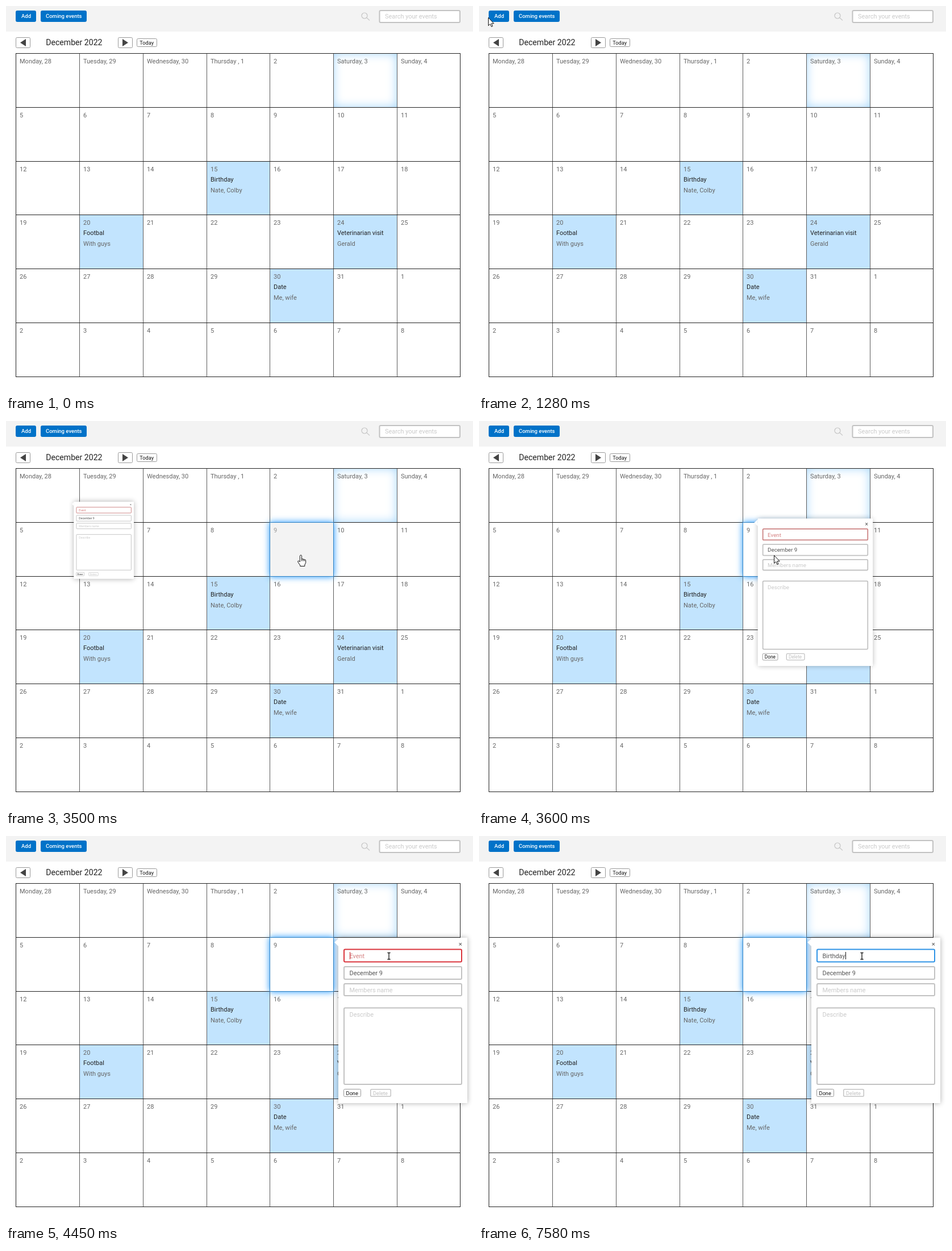
Recreate the animation shown at these times as an HTML page with a canvas. Size 822x681 px, loop 8000 ms.

```html
<!DOCTYPE html>
<html lang="en">
<head>
<meta charset="utf-8">
<title>Event calendar</title>
<style>
  html, body { margin: 0; width: 100%; height: 100%; overflow: hidden; background: #fff; }
  canvas { display: block; width: 822px; height: 681px; }
</style>
</head>
<body>
<canvas id="stage"></canvas>
<script>
const W = 822, H = 681, LOOP = 8000;
const canvas = document.getElementById('stage');
const ctx = canvas.getContext('2d');
const dpr = window.devicePixelRatio || 1;
canvas.width = W * dpr;
canvas.height = H * dpr;

const GREY = '#666', DARK = '#222', FIELD = '#c2c2c2', HINT = '#cacaca';
const EVENT_FILL = '#c2e4fe';
const headings = ['Monday, 28', 'Tuesday, 29', 'Wednesday, 30', 'Thursday , 1', '2', 'Saturday, 3', 'Sunday, 4'];
const events = {
  17: ['Birthday', 'Nate, Colby'],
  22: ['Footbal', 'With guys'],
  26: ['Veterinarian visit', 'Gerald'],
  32: ['Date', 'Me, wife']
};
const TODAY = 5, PICKED = 11;

const word = 'Birthday';
const keyTimes = [5840, 5950, 6080, 6230, 6380, 7290, 7370, 7580];
const caretOff = [[4890, 5400], [6920, 7290]];
const FOCUS = 4350, OPEN = 3418, OPEN_MS = 300;

// Each path: [time, x, y]
const paths = [
  [[530, 783, 598], [590, 728, 547], [800, 420, 350], [1020, 163, 170], [1190, 42, 46], [1280, 16, 20]],
  [[1350, 16, 20], [1450, 58, 55], [1620, 168, 166], [1850, 420, 310], [2010, 512, 358]],
  [[2290, 698, 668], [2350, 612, 495], [2420, 535, 314], [2560, 520, 254], [2810, 519, 236]],
  [[3640, 519, 236], [3800, 606, 215], [4010, 674, 211]]
];

const clamp = v => Math.min(1, Math.max(0, v));
const ramp = (t, from, ms) => clamp((t - from) / ms);
const lerp = (a, b, p) => a + (b - a) * p;
const gridX = i => Math.round(17.4 + 111.7 * i);
const gridY = j => Math.round(83 + 94.8 * j);

function mix(a, b, p) {
  return `rgb(${a.map((v, i) => Math.round(lerp(v, b[i], p)))})`;
}

// cubic-bezier(.25, .1, .25, 1)
function ease(x) {
  if (x <= 0 || x >= 1) return clamp(x);
  const bez = (u, a, b) => 3 * u * (1 - u) ** 2 * a + 3 * u * u * (1 - u) * b + u ** 3;
  let lo = 0, hi = 1;
  for (let i = 0; i < 24; i++) {
    const mid = (lo + hi) / 2;
    if (bez(mid, .25, .25) < x) lo = mid; else hi = mid;
  }
  return bez(lo, .1, 1);
}

function text(s, x, y, size = 11, color = GREY, weight = 400) {
  ctx.font = `${weight} ${size}px Roboto, sans-serif`;
  ctx.fillStyle = color;
  ctx.fillText(s, x, y);
}

function rect(x, y, w, h, color) {
  ctx.fillStyle = color;
  ctx.fillRect(x, y, w, h);
}

// Rounded box with its border drawn inside the bounds
function box(x, y, w, h, stroke, line = 1, fill = '#fff', r = 2) {
  ctx.beginPath();
  ctx.roundRect(x + line / 2, y + line / 2, w - line, h - line, r);
  ctx.fillStyle = fill;
  ctx.fill();
  ctx.lineWidth = line;
  ctx.strokeStyle = stroke;
  ctx.stroke();
}

function poly(points, fill) {
  ctx.beginPath();
  points.forEach(([x, y]) => ctx.lineTo(x, y));
  ctx.closePath();
  ctx.fillStyle = fill;
  ctx.fill();
}

function shadow(color, blur) {
  ctx.shadowColor = color;
  ctx.shadowBlur = blur * dpr;
}

function drawHeader() {
  rect(0, 0, W, 45, '#f3f3f3');
  box(17, 8, 36, 20, '#0072c8', 1, '#0072c8');
  box(61, 8, 81, 20, '#0072c8', 1, '#0072c8');
  text('Add', 27, 21, 9.5, '#fff', 500);
  text('Coming events', 70, 21, 9.5, '#fff', 500);

  ctx.strokeStyle = '#c4c4c4';
  ctx.lineWidth = 1.2;
  ctx.beginPath();
  ctx.arc(631, 17, 5, 0, 7);
  ctx.moveTo(634.8, 20.6);
  ctx.lineTo(640, 25.4);
  ctx.stroke();
  box(656.5, 7, 143.5, 23, FIELD, 2);
  text('Search your events', 667, 22, 10.9, HINT);

  box(17, 55, 26, 19, '#999');
  box(197, 55, 26, 19, '#999');
  poly([[25, 64.5], [35, 58], [35, 71]], '#444');
  poly([[215, 64.5], [205, 58], [205, 71]], '#444');
  text('December 2022', 70.2, 69, 14.1, DARK);
  box(230, 57, 36, 15, '#999');
  text('Today', 235.3, 68, 9.2, '#111');
}

function cellRect(i) {
  const c = i % 7, r = Math.floor(i / 7);
  const x = gridX(c), y = gridY(r);
  return [x, y, gridX(c + 1) - x, gridY(r + 1) - y];
}

function drawDay(i) {
  const [x, y] = cellRect(i);
  const day = i - 2 > 31 ? i - 33 : i - 2;
  text(headings[i] || String(day), x + 7, y + 17.5);
}

function innerGlow(x, y, w, h) {
  ctx.save();
  ctx.beginPath();
  ctx.rect(x, y, w, h);
  ctx.clip();
  shadow('#a5d6fb', 18);
  ctx.beginPath();
  ctx.rect(x - 40, y - 40, w + 80, h + 80);
  ctx.rect(x, y, w, h);
  ctx.fillStyle = '#a5d6fb';
  ctx.fill('evenodd');
  ctx.restore();
}

function drawCalendar() {
  for (const i in events) rect(...cellRect(+i), EVENT_FILL);
  innerGlow(...cellRect(TODAY));
  const left = gridX(0), top = gridY(0), right = gridX(7), bottom = gridY(6);
  for (let c = 0; c <= 7; c++) rect(gridX(c), top, 1, bottom - top + 1, c % 7 ? '#5c5c5c' : '#222');
  for (let r = 0; r <= 6; r++) rect(left, gridY(r), right - left + 1, 1, '#222');
  for (let i = 0; i < 42; i++) {
    drawDay(i);
    if (!events[i]) continue;
    const [x, y] = cellRect(i);
    text(events[i][0], x + 7, y + 36, 11, DARK);
    text(events[i][1], x + 7, y + 55);
  }
}

function drawPicked(t) {
  const glow = ramp(t, 3210, 200);
  const hover = t < 3570 ? ramp(t, 2570, 200) : 0;
  if (!glow && !hover) return;
  const [x, y, w, h] = cellRect(PICKED);
  const fill = mix([255, 255, 255], [243, 243, 243], hover);
  if (glow) {
    ctx.save();
    shadow(`rgba(30,150,255,${glow})`, 11);
    rect(x, y, w + 1, h + 1, '#2d7fc0');
    ctx.restore();
  }
  rect(x + 1, y + 1, w - 1, h - 1, fill);
  text('9', x + 7, y + 17.5, 11, mix([102, 102, 102], [150, 150, 150], hover));
}

function drawEventField(t) {
  const calm = [204, 130, 130], red = [218, 52, 60], blue = [47, 148, 230];
  const typed = keyTimes.filter(k => t >= k).length;
  const border = typed
    ? mix(red, blue, ramp(t, keyTimes[0], 250))
    : mix(calm, red, ramp(t, FOCUS, 100));
  const value = word.slice(0, typed);
  box(9, 19.5, 209, 24, border, 2);
  text(value || 'Event', 19.5, 36, 10.9, typed ? '#555' : '#d58080');
  const blinkOff = caretOff.some(([a, b]) => t >= a && t < b);
  if (t >= FOCUS && !blinkOff) {
    const x = typed ? 19.5 + ctx.measureText(value).width : 19.5;
    rect(Math.round(x), 25, 1, 13, typed ? '#111' : '#c8202a');
  }
}

function drawDialog(t) {
  if (t < OPEN) return;
  const s = ease((t - OPEN) / OPEN_MS);
  if (s < .02) return;
  ctx.save();
  ctx.translate(lerp(-287, 585, s), lerp(110, 179, s));
  ctx.scale(s, s);

  ctx.save();
  shadow('rgba(0,0,0,.32)', 9);
  rect(0, 0, 227, 291, '#fff');
  ctx.restore();
  poly([[0, 2], [-7, 8], [0, 15]], '#fff');

  text('×', 211.8, 15, 11.5, '#555');
  drawEventField(t);
  box(9, 50, 209, 24, FIELD, 2);
  text('December 9', 19.5, 66, 10.9, '#555');
  box(9, 80, 209, 23, FIELD, 2);
  text('Members name', 19.5, 96, 10.9, HINT);
  box(9, 122.5, 209, 136.5, FIELD, 2);
  text('Describe', 19.5, 139, 10.9, HINT);
  box(9, 266, 31, 14, '#999');
  text('Done', 13.6, 276.5, 9.2, '#111');
  box(56, 266, 37, 14, '#c4c4c4', 1.5);
  text('Delete', 61, 276.5, 9.2, '#c0c0c0');
  ctx.restore();
}

const spline = (a, b, c, d, p) =>
  b + p / 2 * (c - a + p * (2 * a - 5 * b + 4 * c - d + p * (3 * (b - c) + d - a)));

function pointerAt(t) {
  const path = paths.filter(p => t >= p[0][0]).pop();
  if (!path) return null;
  const last = path.length - 1;
  if (t >= path[last][0]) return path[last].slice(1);
  const i = path.findIndex(k => k[0] > t) - 1;
  const p = (t - path[i][0]) / (path[i + 1][0] - path[i][0]);
  const at = n => path[Math.min(last, Math.max(0, n))];
  return [1, 2].map(k => spline(at(i - 1)[k], at(i)[k], at(i + 1)[k], at(i + 2)[k], p));
}

function pointerKind(t, x, y) {
  if (t > 3570 && t < 3670) return 'arrow';
  if (t > 3570 && x > 585) return x > 595 ? 'beam' : 'arrow';
  const inGrid = x > gridX(0) && x < gridX(7) && y > gridY(0) && y < gridY(6);
  return inGrid ? 'hand' : 'arrow';
}

const shapes = {
  arrow: new Path2D('M.5 .5V14.6L3.7 11.6L5.9 16.4L8 15.5L5.9 10.8H10.2Z'),
  hand: new Path2D('M-1.6 12V1.5Q-1.6 0 0 0Q1.5 0 1.5 1.5V7Q3.2 5.9 4 7.4Q5.6 6.5 6.3 8.1Q8.6 7.4 8.6 9.8V13.5L6.8 17V19.5H-1.2V18L-5.2 12Q-5.6 9.4 -3.4 10.2Z'),
  folds: new Path2D('M1.5 7V10.5M4 7.4V10.5M6.3 8.1V10.5'),
  beam: new Path2D('M-2.5 -5.5H-.8L0 -5L.8 -5.5H2.5M0 -5V5.5M-2.5 6H-.8L0 5.5L.8 6H2.5')
};

function drawPointer(t) {
  const spot = pointerAt(t);
  if (!spot) return;
  const [x, y] = spot.map(Math.round);
  const kind = pointerKind(t, x, y);
  ctx.save();
  ctx.translate(x, y);
  ctx.strokeStyle = '#111';
  ctx.fillStyle = '#fff';
  ctx.lineWidth = kind === 'beam' ? 1.3 : 1;
  ctx.lineJoin = 'round';
  if (kind !== 'beam') ctx.fill(shapes[kind]);
  ctx.stroke(shapes[kind]);
  if (kind === 'hand') ctx.stroke(shapes.folds);
  ctx.restore();
}

function draw() {
  const t = performance.now() % LOOP;
  ctx.setTransform(dpr, 0, 0, dpr, 0, 0);
  rect(0, 0, W, H, '#fff');
  drawHeader();
  drawCalendar();
  drawPicked(t);
  drawDialog(t);
  drawPointer(t);
  requestAnimationFrame(draw);
}
draw();
</script>
</body>
</html>
```
